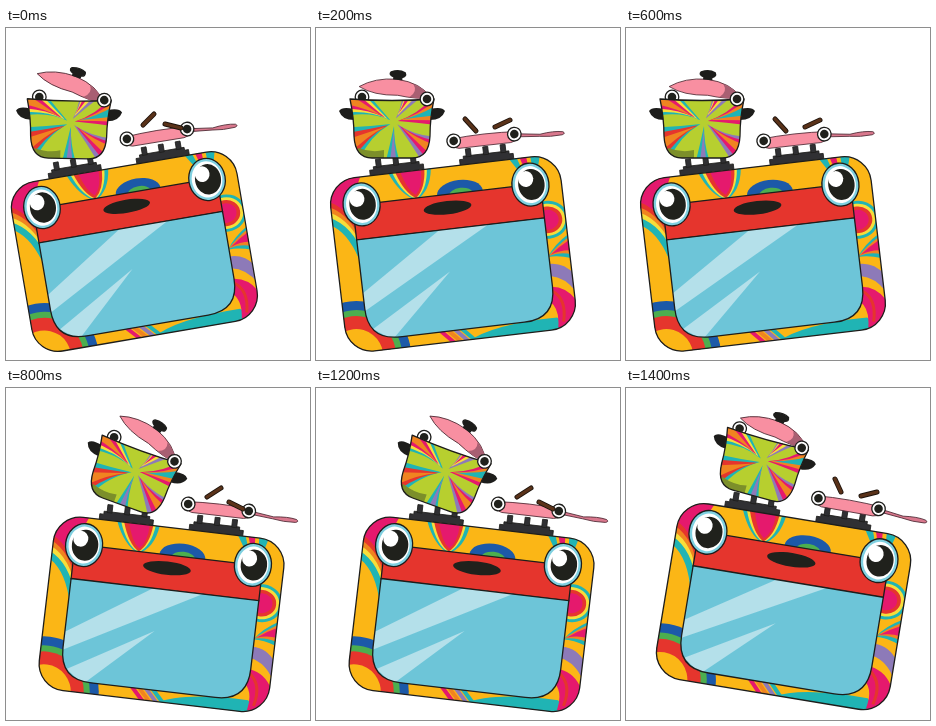
An HTML page that plays this animation: 304x332 px, repeating every 1600 ms.

```html
<!DOCTYPE html>
<html lang="en">
<head>
<meta charset="utf-8">
<title>Dancing oven</title>
<style>
html, body { margin: 0; width: 100%; height: 100%; overflow: hidden; background: #fff; }
svg { display: block; width: 100vw; height: 100vh; }
.ink { stroke: #1d1d1b; stroke-width: 1.3; stroke-linejoin: round; }
.thin { stroke: #4a2630; stroke-width: .8; stroke-linejoin: round; }
</style>
</head>
<body>
<svg viewBox="0 0 304 332">
  <defs>
    <clipPath id="shell"><rect x="-116" y="-27.5" width="232" height="174.5" rx="27"/></clipPath>
    <clipPath id="bowl"><path d="M-42-15Q0-12 42-15Q38 4 38 22Q37 44 20 44H-20Q-37 44-38 22Q-38 4-42-15Z"/></clipPath>
    <clipPath id="glass"><path d="M-94 34.7H95V104Q95 136 63 136H-62Q-94 136-94 104Z"/></clipPath>
    <g id="burner" fill="#303033" stroke="#1d1d1b" stroke-width=".8">
      <path d="M-27-27V-33H-23V-36H23V-33H27V-27Z"/>
      <path d="M-20-35V-43H-15V-35ZM-2.5-35V-43H2.5V-35ZM15-35V-43H20V-35Z"/>
    </g>
    <g id="bigEye">
      <ellipse class="ink" rx="18.5" ry="21.5" fill="#7fd0e0"/>
      <ellipse rx="15.5" ry="18.5" fill="#fff"/>
      <ellipse cx="1" rx="13.2" ry="15.5" fill="#20211c"/>
      <ellipse cx="-4" cy="-6" rx="7.5" ry="8" fill="#fff"/>
    </g>
    <g id="eye">
      <circle class="ink" r="6.8" fill="#fff"/>
      <circle r="4.3" fill="#20211c"/>
    </g>
  </defs>

  <g id="oven">
    <use href="#burner" x="-46"/>
    <use href="#burner" x="44.5"/>
    <g clip-path="url(#shell)">
      <rect x="-116" y="-28" width="232" height="175" fill="#fbb616"/>
      <!-- left side -->
      <path d="M-118-30H-82Q-94-8-93 22Q-104 4-118-3Z" fill="#e5196d"/>
      <g id="swoosh" fill="none" stroke-width="6.5"></g>
      <g id="rainbow"></g>
      <!-- bottom -->
      <path d="M4 149Q30 134 96 135L110 149Z" fill="#20b4b4"/>
      <g id="ribs" stroke-width="4"></g>
      <!-- top -->
      <path d="M-55-28Q-45-4-30 2Q-15-5-12-28Z" fill="#20b4b4"/>
      <path d="M-51-28Q-43-5-30 1Q-18-7-16-28Z" fill="#f7de3a"/>
      <path d="M-48-28Q-41-6-30 0Q-20-8-18.500-28Z" fill="#e5352d"/>
      <path d="M-43-28Q-38-9-30-3Q-22-10-22-28Z" fill="#e5196d"/>
      <ellipse cx="14" cy="0" rx="23" ry="13" fill="#1c59a8"/>
      <ellipse cx="15" cy="2" rx="12" ry="7" fill="#4cae4f"/>
      <path d="M66-29L84 0L74-29Z" fill="#20b4b4"/>
      <path d="M77-29L86 0L84-29Z" fill="#e5196d"/>
      <path d="M88-29L90 0L98-29Z" fill="#20b4b4"/>
      <!-- right side -->
      <g id="bud"></g>
      <path d="M118 53Q102 62 94 74Q104 73 118 78Z" fill="#20b4b4"/>
      <path d="M118 56Q104 64 95 73Q106 70 118 74Z" fill="#f08420"/>
      <path d="M118 59Q106 65 97 72Q108 68 118 70Z" fill="#e5196d"/>
      <path d="M94 81Q109 81 118 94V112Q109 96 94 93Z" fill="#8d7ab8"/>
      <path d="M94 104Q110 106 118 122V145H96Q100 126 90 118Z" fill="#e5196d"/>
      <path d="M94 108Q108 118 102 140" fill="none" stroke="#e5352d" stroke-width="3"/>
    </g>
    <rect class="ink" x="-116" y="-27.5" width="232" height="174.5" rx="27" fill="none"/>
    <path class="ink" d="M-94 35V12Q-92 0-80 0H80Q93 0 95 12V35Z" fill="#e5352d"/>
    <g clip-path="url(#glass)">
      <rect x="-95" y="34" width="191" height="103" fill="#6dc5d8"/>
      <path d="M-10 34H40L-95 107V89ZM-5 77L-88 125L-70 138Z" fill="#b4e0ea"/>
    </g>
    <path class="ink" d="M-94 34.7H95V104Q95 136 63 136H-62Q-94 136-94 104Z" fill="none"/>
    <ellipse cy="13.2" rx="24" ry="6.7" fill="#20211c"/>
    <use href="#bigEye" x="-85"/>
    <use href="#bigEye" x="85"/>
  </g>

  <g id="potBack"><use href="#eye" x="-30" y="-17"/></g>

  <g id="lid">
    <path class="thin" d="M-35-1Q-20-11 2-11Q27-9 37 5Q24 8 4 5Q-20 7-35-1Z" fill="#f88fa1"/>
    <path d="M19-7Q32-3 37 5Q28 8 16 6Q24 0 19-7Z" fill="#a85f72"/>
    <path class="ink" d="M-1-11V-13Q-7-15-4-18Q4-21 10-18Q12-14 7-13V-11Z" fill="#1d1d1b"/>
  </g>

  <g id="pot">
    <path d="M-38-5Q-50-8-53-3Q-50 6-38 6ZM38-5Q50-8 53-3Q50 6 38 6Z" fill="#1d1d1b"/>
    <g clip-path="url(#bowl)">
      <rect x="-45" y="-20" width="90" height="70" fill="#b7cf2f"/>
      <g id="fans"></g>
      <path d="M-34 34Q-20 39-8 36V46H-34Z" fill="#7c8f2a"/>
    </g>
    <path class="ink" d="M-42-15Q0-12 42-15Q38 4 38 22Q37 44 20 44H-20Q-37 44-38 22Q-38 4-42-15Z" fill="none"/>
    <use href="#eye" x="35" y="-15"/>
  </g>

  <g id="pan">
    <path class="thin" d="M33 0L56 3Q70 1 79 3Q82 5 78 6Q66 7 55 5L33 3Z" fill="#d9788d"/>
    <path class="thin" d="M-34-2Q0-5 36-2Q35 7 26 8H-26Q-33 7-34-2Z" fill="#f88fa1"/>
    <use href="#eye" x="-30.500"/>
    <use href="#eye" x="30.500"/>
  </g>
  <g stroke-linecap="round">
    <path id="crumbsEdge" stroke="#1d130c" stroke-width="5"/>
    <path id="crumbs" stroke="#5a3219" stroke-width="3.2"/>
  </g>
</svg>
<script>
const el = id => document.getElementById(id);
const STEP = 200;
const TEAL = "#20b4b4", YELLOW = "#f7de3a", AMBER = "#fbb616", ORANGE = "#f08420",
  RED = "#e5352d", PINK = "#e5196d", PURPLE = "#8d7ab8", BLUE = "#1c59a8", GREEN = "#4cae4f";

// Placement: [x, y, degrees, scale]
const poses = {
  farLeft: {
    oven: [118.5, 165.5, -9.7, .985], pot: [63, 86.5, 1], lid: [64, 58, 19],
    pan: [151, 106, -9.3], crumbs: "M137 97L148 86M159 96L175 100"
  },
  left: {
    oven: [130, 166.5, -6.7], pot: [76, 86, 0], lid: [78, 62, 4],
    pan: [168, 109.5, -6.4], crumbs: "M149 91L160 103M179 99L194 92"
  },
  right: {
    oven: [162.5, 167, 6.7], pot: [130.5, 75.5, 20], lid: [142, 49, 35],
    pan: [212.5, 119.5, 6.6], crumbs: "M201 109L215 100M223 114L237 121"
  },
  farRight: {
    oven: [167.5, 158.5, 9.4, 1.02], pot: [138, 65, 15.5], lid: [147, 43, 20],
    pan: [222.5, 115.5, 10], crumbs: "M209 91L215 104M235 108L251 104"
  }
};
const { farLeft, left, right, farRight } = poses;
const dance = [farLeft, left, farLeft, left, right, farRight, right, farRight];

function fill(id, items, shape) {
  el(id).innerHTML = items.map(shape).join("");
}

fill("swoosh", [RED, ORANGE, YELLOW, TEAL], (c, i) => {
  const y = -4 + i * 5.5;
  return `<path d="M-120 ${y}Q-100 ${y + 9} -91 ${y + 40}" stroke="${c}"/>`;
});
fill("rainbow", [[55, BLUE], [46, GREEN], [40, RED], [27, AMBER]],
  ([r, c]) => `<circle cx="-108" cy="150" r="${r}" fill="${c}"/>`);
fill("ribs", [PINK, ORANGE, PURPLE, TEAL],
  (c, i) => `<path d="M${-22 + i * 7} 134l14 15" stroke="${c}"/>`);
fill("bud", [[20, TEAL], [17, YELLOW], [14, RED], [10.5, PINK]],
  ([r, c]) => `<ellipse cx="98" cy="37" rx="${r * 1.05}" ry="${r * .95}" fill="${c}"/>`);

// Nested spikes that narrow towards the middle of the pot
function fan([deg, width, colors]) {
  const bands = colors.map((c, i) => {
    const w = width * (1 - i / colors.length);
    return `<path d="M${4 + i * 3} 0Q32 ${1 - w * .1} 54 ${-w}V${w}Q32 ${w * .5} ${4 + i * 3} 0Z" fill="${c}"/>`;
  });
  return `<g transform="translate(2 8) rotate(${deg})">${bands.join("")}</g>`;
}
fill("fans", [
  [-154, 23, [TEAL, YELLOW, PINK, ORANGE]],
  [-62, 21, [PURPLE, YELLOW, PINK]],
  [-16, 21, [PINK, ORANGE, TEAL]],
  [35, 20, [PURPLE, PINK, ORANGE]],
  [90, 12, [TEAL, PURPLE]],
  [152, 22, [TEAL, RED, ORANGE]]
], fan);

function place(id, [x, y, deg, k = 1]) {
  el(id).setAttribute("transform", `translate(${x} ${y}) rotate(${deg}) scale(${k})`);
}

function draw(time) {
  const pose = dance[Math.floor(time / STEP) % dance.length];
  for (const id of ["oven", "pot", "lid", "pan"]) place(id, pose[id]);
  place("potBack", pose.pot);
  for (const id of ["crumbs", "crumbsEdge"]) el(id).setAttribute("d", pose.crumbs);
}

const start = performance.now();
function tick() {
  draw(performance.now() - start);
  requestAnimationFrame(tick);
}
tick();
</script>
</body>
</html>
```
